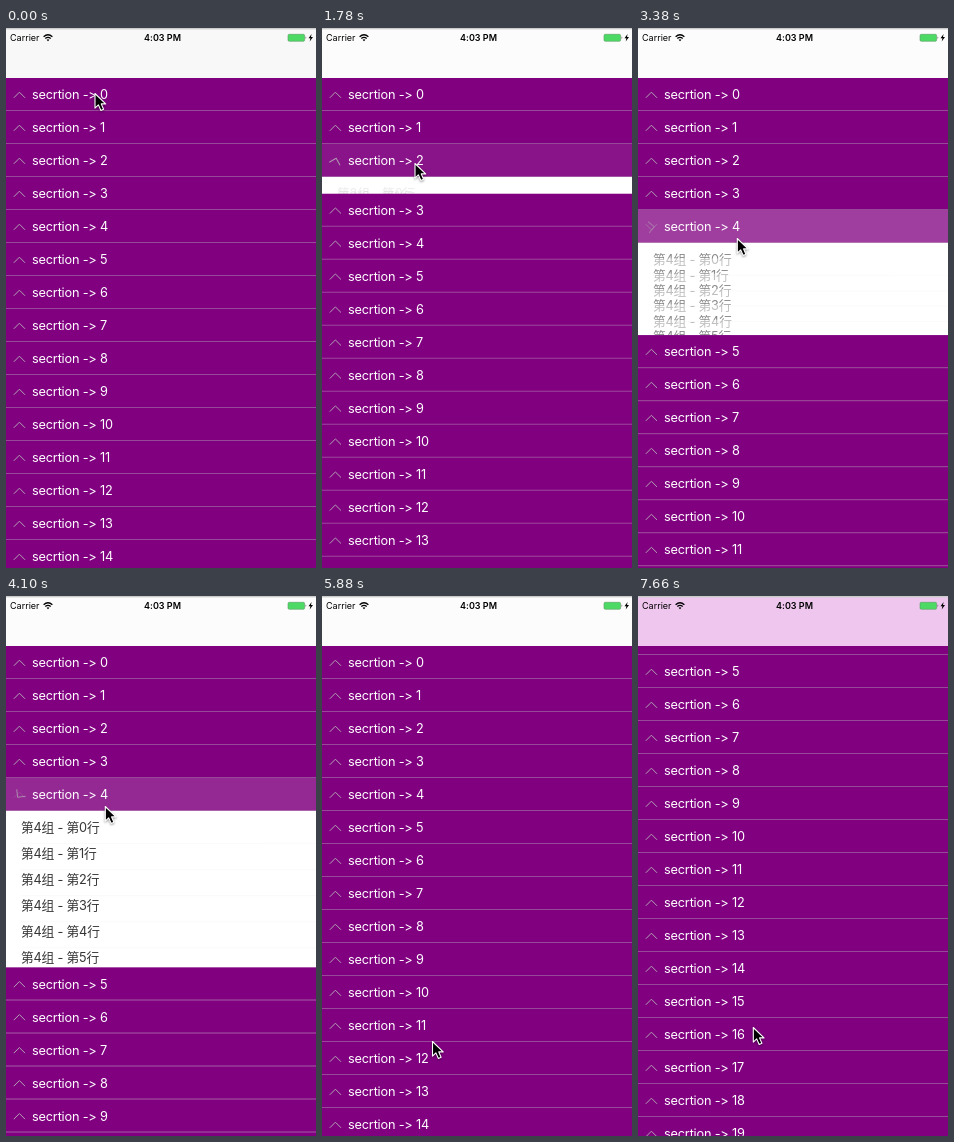
An HTML page for the animation above (8000 ms loop, 310 by 540 pixels).

```html
<!DOCTYPE html>
<html lang="zh">
<head>
<meta charset="utf-8">
<style>
html, body { margin: 0; width: 310px; height: 540px; overflow: hidden; background: #fff; }
svg { display: block; }
text { font-family: Inter, "Noto Sans CJK SC", "Noto Sans CJK", sans-serif; font-size: 12.75px;
  letter-spacing: -.2px; font-variant-ligatures: none; font-feature-settings: "calt" 0; white-space: pre; }
.status text { font-size: 9px; letter-spacing: 0; }
</style>
</head>
<body>
<svg id="stage" width="310" height="540" viewBox="0 0 310 540">
  <rect width="310" height="540" fill="#fff"/>
  <g id="table"><g id="rows"></g><g id="heads"></g></g>
  <rect id="bar" width="310" height="50"/>
  <rect width="310" height="1.4" fill="#cbcbcb"/>
  <g class="status">
    <text x="4" y="13">Carrier</text>
    <text x="156.5" y="13" text-anchor="middle" font-weight="600">4:03 PM</text>
    <g fill="none" stroke="#000" stroke-width="1.3">
      <path d="M37.6 8.7Q42 4.9 46.4 8.7M39.3 10.6Q42 8.3 44.7 10.6"/>
      <path d="M42 13.2L40.6 11.8Q42 10.7 43.4 11.8Z" fill="#000" stroke="none"/>
    </g>
    <rect x="282" y="6.3" width="16.6" height="7" rx="1.3" fill="#4cd964" stroke="#5d9a66" stroke-width=".6"/>
    <path d="M299.6 8.3Q301 9.8 299.6 11.3Z" fill="#555"/>
    <path d="M305.6 6L302.5 10.3H304.4L303.7 13.5L307 9.1H305Z" fill="#000"/>
  </g>
  <path id="cursor" d="M0 0V14.6L3.4 11.4L5.9 17L8.6 15.8L6.2 10.4H10.7Z" fill="#000" stroke="#fff"
    stroke-width="1.1" stroke-linejoin="round" style="filter:drop-shadow(0 1px 1px rgba(0,0,0,.4))"/>
</svg>
<script>
const LOOP = 8000, TICK = 178.1, TOP = 50, H = 33, ROWS = 6, SECTIONS = 22, FOLD = 300;
const $ = id => document.getElementById(id);

function add(parent, tag, attrs, text) {
  const el = document.createElementNS("http://www.w3.org/2000/svg", tag);
  set(el, attrs);
  if (text) el.textContent = text;
  parent.appendChild(el);
  return el;
}
function set(el, attrs) {
  for (const k in attrs) el.setAttribute(k, attrs[k]);
}
const clamp = x => Math.max(0, Math.min(1, x));
const mix = (a, b, u) => a + (b - a) * u;

// cubic-bezier(.42, 0, .58, 1)
function ease(x) {
  if (x <= 0 || x >= 1) return clamp(x);
  let lo = 0, hi = 1, s;
  for (let i = 0; i < 24; i++) {
    s = (lo + hi) / 2;
    const r = 1 - s;
    if (1.26 * s * r * r + 1.74 * s * s * r + s * s * s < x) lo = s; else hi = s;
  }
  return s * s * (3 - 2 * s);
}

// section, time it opens, time it closes
const taps = [[0, 120, 1021], [2, 1720, 2458], [4, 3240, 4001], [8, 4637, 5300]];

// start, end, x, y of each pointer stop
const moves = [
  [0, 1, 89, 65.5], [1300, 1425, 93, 135.5], [2700, 3025, 99.3, 210.5],
  [4290, 4450, 99.5, 324.5], [5540, 5875, 110.5, 445.5], [6380, 7300, 115.3, 431.5]
];

const heads = Array.from({ length: SECTIONS }, (_, i) => {
  const g = add($("heads"), "g", {});
  const body = add(g, "g", {});
  add(body, "rect", { width: 310, height: H, fill: "#800080" });
  add(body, "rect", { y: H - 1, width: 310, height: 1, fill: "#984898" });
  add(body, "text", { x: 26, y: 21.2, fill: "#fff" }, "secrtion -> " + i);
  const arrow = () => add(g, "path", { d: "M-5.6 2.8L0 -2.8L5.6 2.8", fill: "none", stroke: "#b3a3b3" });
  return { g, body, old: arrow(), now: arrow() };
});

const rows = Array.from({ length: ROWS }, () => {
  const g = add($("rows"), "g", {});
  add(g, "rect", { width: 310, height: H, fill: "#fff" });
  add(g, "rect", { x: 15, y: H - 1, width: 295, height: 1, fill: "#e6e6e8" });
  return { g, label: add(g, "text", { x: 15, y: 21.2, fill: "#000" }) };
});

function fold(i, t) {
  const tap = taps.find(p => p[0] === i);
  if (!tap || t < tap[1]) return { from: 0, to: 0, p: 1 };
  const closing = t >= tap[2];
  const p = ease((t - tap[closing ? 2 : 1]) / FOLD);
  return { from: +closing, to: +!closing, p };
}

function drawTable(t) {
  const scroll = Math.round(156 * (1 - Math.pow(1 - clamp((t - 6350) / 1308), 2.5)));
  set($("table"), { transform: `translate(0 ${TOP - scroll})` });
  set($("rows"), { opacity: 0 });
  let y = 0;
  heads.forEach((h, i) => {
    const { from, to, p } = fold(i, t), open = mix(from, to, p);
    set(h.g, { transform: `translate(0 ${y})` });
    set(h.body, { opacity: 1 - p * (1 - p) });
    set(h.old, { opacity: 1 - p, transform: `translate(13.4 17) rotate(${180 * (from + p)})` });
    set(h.now, { opacity: p, transform: `translate(13.4 17) rotate(${180 * to})` });
    y += H;
    if (open > 0) {
      set($("rows"), { opacity: 1 });
      rows.forEach((r, n) => {
        set(r.g, { transform: `translate(0 ${y + n * H * open})`, opacity: open });
        r.label.textContent = `第${i}组 - 第${n}行`;
      });
      y += ROWS * H * open;
    }
  });
  return scroll;
}

function drawBar(t, scroll) {
  const white = mix(248, 252, clamp(t / 710)), u = clamp(scroll / 48);
  const rgb = [238, 198, 238].map(c => Math.round(mix(white, c, u)));
  set($("bar"), { fill: `rgb(${rgb})` });
}

function drawCursor(t) {
  let [, , x, y] = moves[0];
  for (const [a, b, nx, ny] of moves) {
    const u = ease((t - a) / (b - a));
    x = mix(x, nx, u);
    y = mix(y, ny, u);
  }
  set($("cursor"), { transform: `translate(${x} ${y})` });
}

function render(ms) {
  const t = Math.floor((ms % LOOP + 5) / TICK) * TICK;
  drawBar(t, drawTable(t));
  drawCursor(t);
}

const start = performance.now();
function loop() {
  render(performance.now() - start);
  requestAnimationFrame(loop);
}
loop();
</script>
</body>
</html>
```
